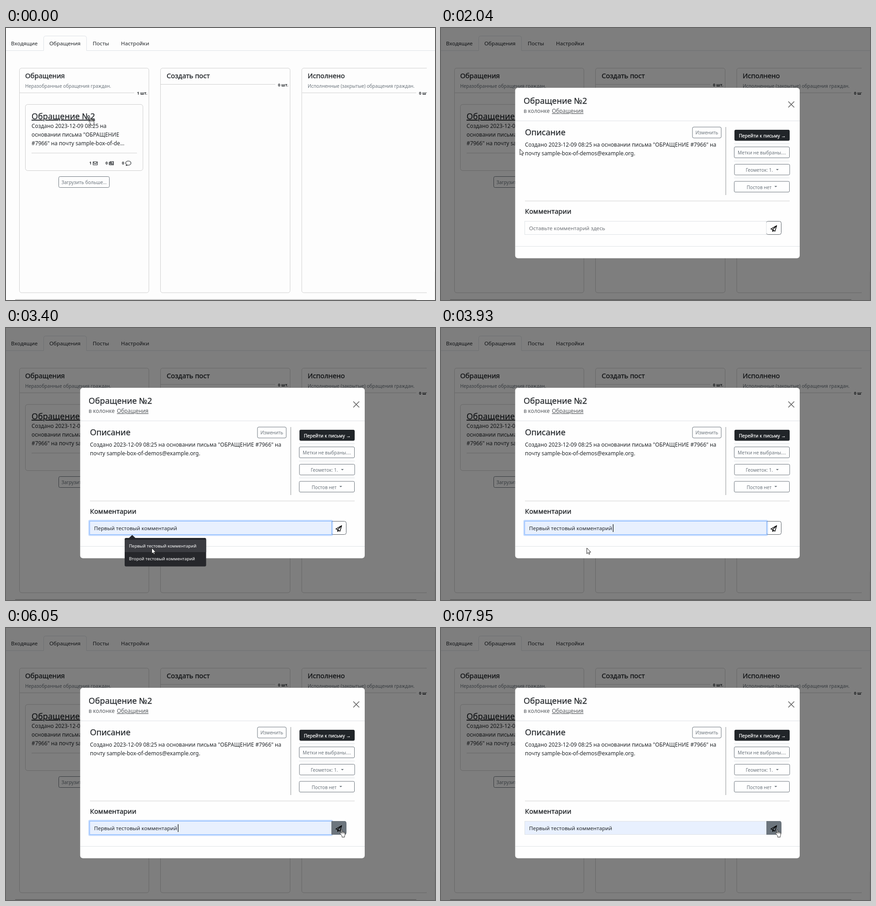
Write an HTML page that moves like this. It is 940 px wide and 596 px high and loops after 8000 ms.

```html
<!DOCTYPE html>
<html lang="ru">
<head>
<meta charset="utf-8">
<title>Обращения</title>
<style>
html, body { margin: 0; width: 100%; height: 100%; overflow: hidden; background: #fdfdfd; }
svg { display: block; }
text { font: 11.65px "Noto Sans", "Open Sans", sans-serif; fill: #212529; white-space: pre; }
.body { font-size: 11.85px; }
.h5 { font-size: 14.8px; stroke: #212529; stroke-width: .35px; }
.h4 { font-size: 18px; stroke: #212529; stroke-width: .25px; }
.small { font-size: 10.15px; fill: #6c757d; }
.sub { font-size: 11.8px; fill: #55595d; }
.count { font-size: 8.7px; font-weight: 700; }
.link { text-decoration: underline; }
.mid { text-anchor: middle; }
.field { font-size: 11.55px; }
.light { font-size: 9.4px; fill: #fff; }
.box { fill: none; stroke: #cfcfcf; }
.rule { stroke: #cfcfcf; }
.pale { stroke: #dee2e6; }
.btn { fill: none; stroke: #6c757d; }
.icon { fill: none; stroke: #212529; stroke-width: 1.2; stroke-linejoin: round; }
[hidden] { display: none; }
</style>
</head>
<body>
<svg width="940" height="596" viewBox="0 0 940 596">
  <defs>
    <clipPath id="board"><rect y="60" width="922" height="536"/></clipPath>
    <path id="caretDown" d="M0 0h6l-3 3z" fill="#6c757d"/>
    <g id="arrow" stroke="#222" stroke-width="1" fill="#fff">
      <path d="M.5.5v12.6l2.9-2.6 1.9 4 1.9-.9-1.9-3.9h3.9z"/>
    </g>
    <g id="ibeam" fill="none" stroke="#222" stroke-width="1.1">
      <path d="M-2.5-6.5h2l.5.7.5-.7h2M0-6v12M-2.5 6.5h2l.5-.7.5.7h2"/>
    </g>
    <g id="hand" stroke="#222" stroke-width="1" stroke-linejoin="round" fill="#fff">
      <path d="M3.2 11.2.8 8.4C-.3 7 1 5.8 2.2 6.8l1.5 1.5V1.7c0-1.6 2.1-1.6 2.1 0v4.1c.3-1 2-.9 2.1.3.4-.9 2-.7 2.1.5.5-.7 1.9-.5 1.9.8v3.4c0 2-1.1 3-1.1 4.2v1.7H5.2V15c0-1.3-1.3-2.5-2-3.8z"/>
      <path d="M5.8 5.8v3M7.9 6.3v2.6M10 6.8v2.2" fill="none" stroke-width=".8"/>
    </g>
  </defs>

  <rect width="940" height="596" fill="#fdfdfd"/>

  <path class="pale" fill="none" d="M0 49.5h82.5v-27q0-5 5-5h84q5 0 5 5v27H940"/>
  <text x="11" y="38">Входящие</text>
  <text x="95" y="38">Обращения</text>
  <text x="190" y="38">Посты</text>
  <text x="252" y="38">Настройки</text>

  <g clip-path="url(#board)">
    <rect class="box" x="29.5" y="88" width="283.5" height="492" rx="4.5"/>
    <text class="h5" x="42" y="110">Обращения</text>
    <text class="small" x="42" y="131">Неразобранные обращения граждан.</text>
    <path class="rule" d="M30 142h251"/>
    <text class="count" x="287" y="146">1 шт.</text>

    <rect class="box" x="338.5" y="88" width="284" height="492" rx="4.5"/>
    <text class="h5" x="352" y="110">Создать пост</text>
    <path class="rule" d="M339 123.5h251"/>
    <text class="count" x="596" y="127.5">0 шт.</text>

    <rect class="box" x="648" y="88" width="284" height="492" rx="4.5"/>
    <text class="h5" x="661" y="110">Исполнено</text>
    <text class="small" x="661" y="131">Исполненные (закрытые) обращения граждан.</text>
    <path class="rule" d="M649 142h250"/>
    <text class="count" x="905" y="146">0 шт.</text>
  </g>

  <rect class="box" x="42.5" y="167.5" width="257.5" height="145" rx="5"/>
  <text class="h4 link" x="56" y="200">Обращение №2</text>
  <text class="body" x="56" y="219">Создано 2023-12-09 08:25 на</text>
  <text class="body" x="56" y="238">основании письма "ОБРАЩЕНИЕ</text>
  <text class="body" x="56" y="256.5">#7966" на почту sample-box-of-de...</text>
  <path class="rule" d="M56 274h231"/>
  <text class="count" x="182.5" y="299">1</text>
  <text class="count" x="218" y="299">0</text>
  <text class="count" x="254" y="299">0</text>
  <g class="icon">
    <path d="M191 293h9v7h-9zM191 294.5l4.5 3 4.5-3"/>
    <path d="M228 292.5h7.5v7.5h-8.500q-1 0-1-1.500v-4h2zM229.500 294.500h2v2h-2zM233 294.500h1.500M233 296.500h1.500M229.500 298.300h5M228 294v5"/>
    <path d="M263 301.500q1.200-1 1.200-2.300-2-1.200-2-3.200c0-2.600 2.600-4.500 5.800-4.500s5.800 1.900 5.800 4.500-2.600 4.500-5.800 4.500q-1 0-2-.3-1.200 1-3 1.300z"/>
  </g>
  <rect class="btn" x="115.500" y="325.500" width="111" height="24" rx="3"/>
  <text class="small mid" x="171" y="342">Загрузить больше…</text>
  <rect x="20" y="594.500" width="879" height="1.500" fill="#b9b9b9"/>
  <path d="M939.500 534v62" stroke="#efefef"/>

  <g id="modal" hidden>
    <rect width="940" height="596" opacity=".5"/>
    <ellipse id="dot" cx="161" cy="334" rx="2.500" ry="3"/>
    <rect x="162.500" y="131" width="623.500" height="373.500" rx="6" fill="#fefefe"/>
    <text class="h4" x="181" y="165.500">Обращение №2</text>
    <text class="sub" x="181" y="186">в колонке</text>
    <text class="sub link" x="243" y="186">Обращения</text>
    <path d="M761.500 161.500l12 12m0-12l-12 12" stroke="#6a6a6a" stroke-width="1.700" stroke-linecap="round"/>
    <path class="pale" d="M163 203.500h623M163 478.500h623"/>

    <text class="h4" x="184" y="235">Описание</text>
    <rect class="btn" x="551" y="217" width="63" height="24" rx="3"/>
    <text class="small mid" x="582.500" y="233">Изменить</text>
    <text class="body" x="184" y="260">Создано 2023-12-09 08:25 на основании письма "ОБРАЩЕНИЕ #7966" на</text>
    <text class="body" x="184" y="278.500">почту sample-box-of-demos@example.org.</text>
    <path d="M624 217v149" stroke="#8a8d90"/>
    <path class="rule" d="M184 379h580"/>

    <rect x="643" y="223" width="121" height="24" rx="3" fill="#212529"/>
    <text class="small mid" x="704" y="239.500" style="fill:#fff;stroke:#fff;stroke-width:.2px">Перейти к письму →</text>
    <path class="pale" d="M642 253.500h122M642 291.500h122M642 328.500h122"/>
    <rect class="btn" x="642.500" y="260.500" width="121" height="24" rx="2.500"/>
    <text class="small mid" x="703" y="277">Метки не выбраны....</text>
    <rect class="btn" x="643" y="298.500" width="121" height="23.500" rx="2.500"/>
    <text class="small mid" x="697.500" y="314.500">Геометок: 1.</text>
    <use href="#caretDown" x="734" y="309"/>
    <rect class="btn" x="642.500" y="336" width="121" height="23.500" rx="2.500"/>
    <text class="small mid" x="697" y="352.500">Постов нет</text>
    <use href="#caretDown" x="730.500" y="346"/>

    <text class="h5" x="184" y="407">Комментарии</text>
    <rect id="send" x="712.500" y="423.500" width="33" height="29" rx="4" stroke="#5c636a"/>
    <rect id="input" x="183.500" y="423.500" width="529.500" height="29" stroke="#dee2e6"/>
    <g id="focus" fill="none">
      <rect x="182" y="422" width="533" height="32" rx="1.500" stroke="#0d6efd" stroke-opacity=".25" stroke-width="3"/>
      <rect x="183.500" y="423.500" width="530" height="29" stroke="#86b7fe"/>
    </g>
    <path id="sendHover" d="M713 423h28.500q4 0 4 4v22q0 4-4 4H713z" fill="#6c757d"/>
    <path class="icon" style="stroke:#000;stroke-width:1.400" d="M735.500 433l-12.700 7.300 4 1.700 5 3.300zM735.500 433l-8.700 9v4l2.200-2.300"/>
    <text id="placeholder" class="field" x="193" y="443" style="fill:#6c7075">Оставьте комментарий здесь</text>
    <text id="comment" class="field" x="193" y="443">Первый тестовый комментарий</text>
    <rect id="caret" y="430" width="1.200" height="17"/>

    <g id="hints">
      <path d="M269 460.500l7.500-7 7.500 7z" fill="#26272b"/>
      <rect x="260" y="460" width="178.500" height="62.500" rx="3" fill="#26272b"/>
      <rect id="hintHover" x="260" y="464" width="178.500" height="27" fill="#3b3c41"/>
      <text class="light" x="269.500" y="481">Первый тестовый комментарий</text>
      <text class="light" x="269.500" y="509">Второй тестовый комментарий</text>
    </g>
  </g>

  <use id="cursor"/>
</svg>
<script>
const LOOP = 8000;

// time, pointer shape, x, y
const pointer = [
  [0, "hand", 181, 196.5],
  [870, "arrow", 184, 196],
  [2040, "arrow", 172.5, 265],
  [2160, "arrow", 178, 305],
  [2280, "arrow", 196, 365],
  [2400, "arrow", 219, 412],
  [2520, "ibeam", 234, 438],
  [2640, "ibeam", 237, 440],
  [3010, "ibeam", 237.5, 448],
  [3130, "arrow", 289, 466],
  [3280, "arrow", 310, 476],
  [3400, "arrow", 319, 481.5],
  [4200, "arrow", 292, 472],
  [4320, "ibeam", 240, 446],
  [4440, "ibeam", 222, 436],
  [4560, "ibeam", 268, 434],
  [4680, "ibeam", 370, 437],
  [4800, "ibeam", 490, 438],
  [4920, "ibeam", 611, 439],
  [5040, "hand", 722, 441],
  [5160, "arrow", 796, 440],
  [5280, "arrow", 776, 442],
  [5400, "hand", 739, 442],
  [5520, "hand", 731, 441.5],
  [7420, "hand", 732, 441.5],
  [7950, "hand", 732.5, 441.5]
];

// times at which the caret toggles, starting hidden
const blinks = [2520, 3130, 3680, 4440, 4920, 5520, 6050, 6550];

const el = id => document.getElementById(id);
const show = (id, on) => el(id).toggleAttribute("hidden", !on);
const within = (t, from, to) => t >= from && t < to;

function draw(t) {
  const [, shape, x, y] = pointer.findLast(p => p[0] <= t);
  el("cursor").setAttribute("href", "#" + shape);
  el("cursor").setAttribute("transform", `translate(${x} ${y})`);

  const filled = t >= 3130;
  const overSend = t > 5000 && shape === "hand";
  show("modal", t >= 870);
  show("dot", t < 1260);
  show("hints", within(t, 2640, 3930));
  show("hintHover", filled);
  show("placeholder", !filled);
  show("comment", filled);
  show("focus", within(t, 2520, 7170));
  el("focus").setAttribute("opacity", t < 7050 ? 1 : 0.5);
  el("input").setAttribute("fill", filled ? "#e8f0fe" : "#fefefe");
  el("send").setAttribute("fill", "#fefefe");
  show("sendHover", overSend);

  show("caret", blinks.filter(b => b <= t).length % 2);
  el("caret").setAttribute("x", t < 3930 ? 193.6 : 376.6);
}

function frame() {
  draw(performance.now() % LOOP);
  requestAnimationFrame(frame);
}
frame();
</script>
</body>
</html>
```
